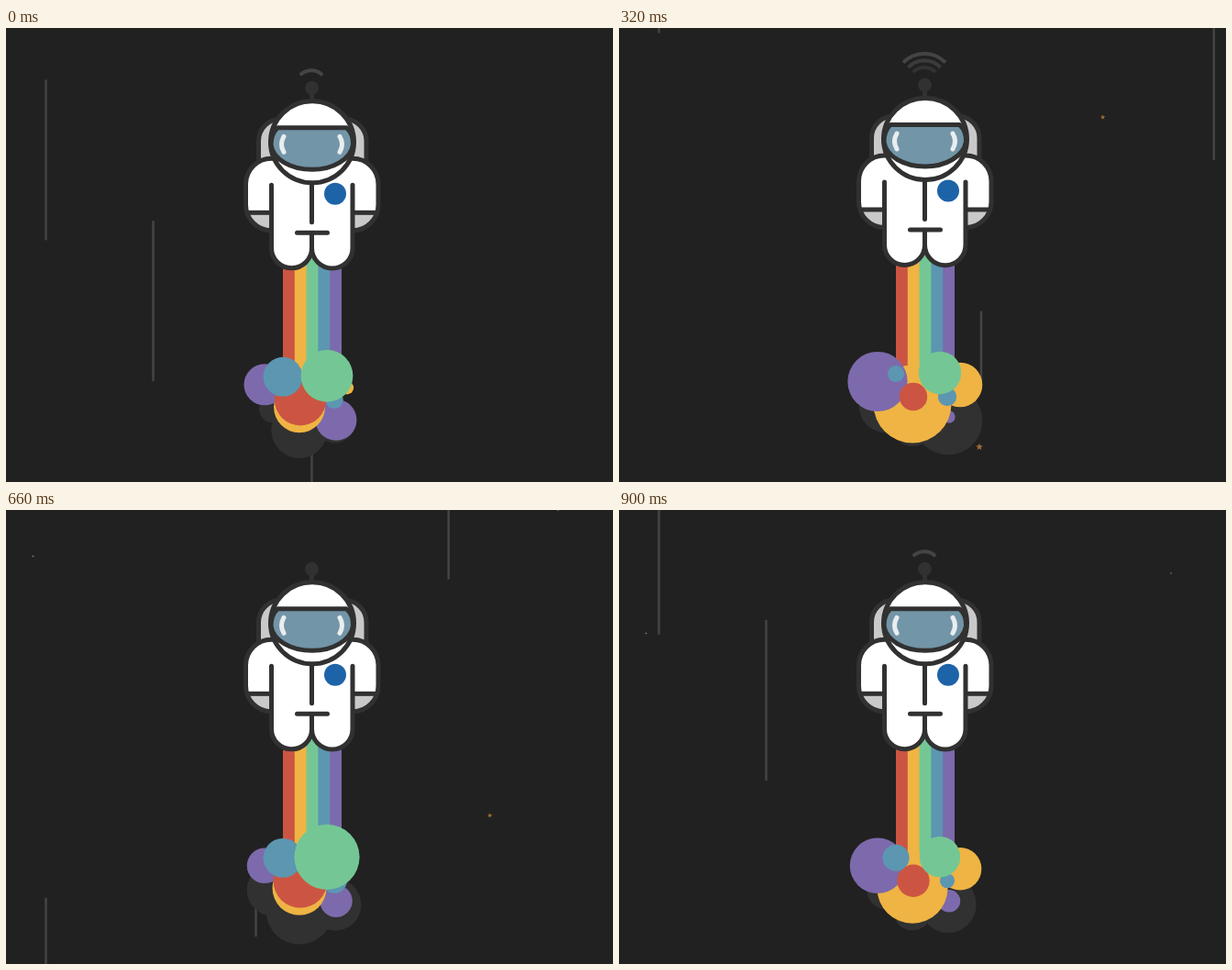
Write an HTML page with a canvas that moves like this. It is 662 by 495 pixels and loops after 0.92 s.

```html
<!DOCTYPE html>
<html lang="en">
<head>
<meta charset="utf-8">
<title>Rainbow astronaut</title>
<style>
  html, body { margin: 0; width: 100%; height: 100%; overflow: hidden; background: #212121; }
  canvas { display: block; }
</style>
</head>
<body>
<canvas id="stage" width="662" height="495"></canvas>
<script>
const ctx = document.getElementById('stage').getContext('2d');
const LOOP = 920, STEP = 20, TAU = Math.PI * 2, CENTRE = 333.5;
const INK = '#313131', GREY = '#c9c9c9', RED = '#cb5542', YELLOW = '#efb443',
      GREEN = '#74c794', BLUE = '#5c96b1', PURPLE = '#7d6aac';

const body = new Path2D('M289.5 168V236.5a22 22 0 0 0 44 0a22 22 0 0 0 44.5 0V168');
const seams = new Path2D('M333.5 160V208.5M317.5 220H350.5M333.5 220V238');
const visor = new Path2D('M296 105.5H371.5Q379 112 378.5 124C376 140 356 151 334 151C311 151 291 140 289 124Q289 112 296 105.5Z');
const glints = new Path2D('M303 115Q298 123.5 303 132M364 115Q369 123.5 364 132');

const clamp = v => Math.min(1, Math.max(0, v));
const ease = (t, a, b) => { const k = clamp((t - a) / (b - a)); return k * k * (3 - 2 * k); };

function bob(t) {
  if (t < LOOP / 2) return 4 * (1 - ease(t, -80, 225));
  return 4 * (ease(t, 560, 740) - ease(t, 760, 1070));
}

function disc(x, y, r, fill) {
  ctx.fillStyle = fill;
  ctx.beginPath();
  ctx.arc(x, y, r, 0, TAU);
  ctx.fill();
}

function shape(path, fill, stroke = INK) {
  if (fill) { ctx.fillStyle = fill; ctx.fill(path); }
  ctx.strokeStyle = stroke;
  ctx.lineWidth = 5;
  ctx.stroke(path);
}

function roundBox(x, y, w, h, r) {
  const path = new Path2D();
  path.roundRect(x, y, w, h, r);
  return path;
}

// Faster stars are nearer, so they are larger and warmer.
function star(x, y, speed) {
  const r = Math.min(4, 4 * speed);
  ctx.fillStyle = speed > .5 ? '#9a6a34' : '#888';
  ctx.beginPath();
  for (let i = 0; i < 10; i++) {
    const a = i * TAU / 10 - TAU / 4, d = i % 2 ? r * .45 : r;
    ctx.lineTo(x + d * Math.cos(a), y + d * Math.sin(a));
  }
  ctx.fill();
}

// Streaks in the open speed up as they fall; those behind the astronaut
// are short, steady and come out below the arms.
function streak(t, x, start, speed, period = 2 * LOOP) {
  const age = (t - start + period) % period;
  const hidden = Math.abs(x - CENTRE) < 70;
  const bottom = speed * age * (hidden ? 1 : 1 + age / 600);
  const top = Math.max(hidden ? 200 : 0, bottom - (hidden ? 77 : 175));
  ctx.fillStyle = '#444';
  if (bottom > top) ctx.fillRect(x - 1.25, top, 2.5, bottom - top);
}

function drawSky(t) {
  const fallingStar = (x, start, speed) => star(x, speed * (t - start), speed);
  fallingStar(527.7, 180, .694);
  fallingStar(393, 5, 1.45);
  fallingStar(29.5, 516, .35);
  fallingStar(602, 659, .286);

  streak(t, 43.5, 315, 1.1, 480);
  streak(t, 160.5, 758, 1.68, 935);
  streak(t, 482.7, 618, 1.68);
  streak(t, 648.8, 227, 1.34);
  streak(t, 395, -168, .79);
  streak(t, 272.5, 204, 1.02);
  streak(t, CENTRE, -640, .8);
}

function drawTrail(t) {
  [RED, YELLOW, GREEN, BLUE, PURPLE].forEach((fill, i) => {
    const x = 302 + i * 12.8;
    ctx.fillStyle = fill;
    ctx.fillRect(x, 235, 366 - x, 160);
  });

  // Every puff breathes by the same amount around its own size.
  const puff = (fill, x, y, size, peak, period = 500) =>
    disc(x, y, size + 9 * Math.cos(TAU * (t - peak) / period), fill);
  puff(INK, 291, 412, 24, 245);
  puff(INK, 320, 435, 29, 110);
  puff(INK, 359, 428, 29, 290);
  puff(PURPLE, 360, 424, 15.5, 555);
  puff(YELLOW, 372, 389, 15.5, 340, 610);
  puff(YELLOW, 320, 410, 33.5, 322);
  puff(BLUE, 358, 402, 16.7, 440, 316);
  puff(PURPLE, 282, 385.5, 27, 407, 610);
  puff(RED, 321, 402, 24, 87);
  puff(BLUE, 302, 377, 18, 90, 480);
  puff(GREEN, 350, 376, 27.5, 133, 568);
}

// Arcs light up from the inside out, then fade in the same order.
function drawSignal(t) {
  ctx.strokeStyle = '#444';
  ctx.lineWidth = 4;
  ctx.lineCap = 'butt';
  for (let i = 0; i < 3; i++) {
    const lit = time => clamp((time + 60 - 120 * i) / 60 + 1);
    const fade = clamp(1 - (t - 140 - 90 * i) / 350);
    ctx.globalAlpha = Math.max(lit(t) * fade, lit(t - LOOP - 40));
    ctx.beginPath();
    ctx.arc(333, 60, 17 + 7.5 * i, -TAU / 4 - .8, -TAU / 4 + .8);
    ctx.stroke();
  }
  ctx.globalAlpha = 1;
}

function drawAstronaut() {
  ctx.lineCap = ctx.lineJoin = 'round';
  disc(CENTRE, 62, 7.5, INK);
  ctx.fillRect(331, 66, 5, 12);
  shape(roundBox(275.5, 96, 117.5, 100, 24), GREY);

  const arms = roundBox(261.5, 139, 144.5, 78.5, 28);
  ctx.fillStyle = '#fff';
  ctx.fill(arms);
  ctx.save();
  ctx.clip(arms);
  ctx.fillStyle = GREY;
  ctx.fillRect(255, 198, 160, 30);
  ctx.fillStyle = INK;
  ctx.fillRect(255, 195.5, 160, 5);
  ctx.restore();
  shape(arms);

  shape(body, '#fff');
  shape(seams);
  disc(359, 177.5, 12, '#1d63a8');

  const helmet = new Path2D();
  helmet.ellipse(334, 121, 45.5, 44.5, 0, 0, TAU);
  shape(helmet, '#fff');
  shape(visor, '#7295a7');
  shape(glints, null, '#e9edf0');
}

function frame(now) {
  const t = Math.floor(now % LOOP / STEP) * STEP;
  ctx.fillStyle = '#212121';
  ctx.fillRect(0, 0, 662, 495);
  drawSky(t);
  ctx.save();
  ctx.translate(0, bob(t));
  drawTrail(t);
  drawSignal(t);
  drawAstronaut();
  ctx.restore();
  requestAnimationFrame(frame);
}
requestAnimationFrame(frame);
</script>
</body>
</html>
```
